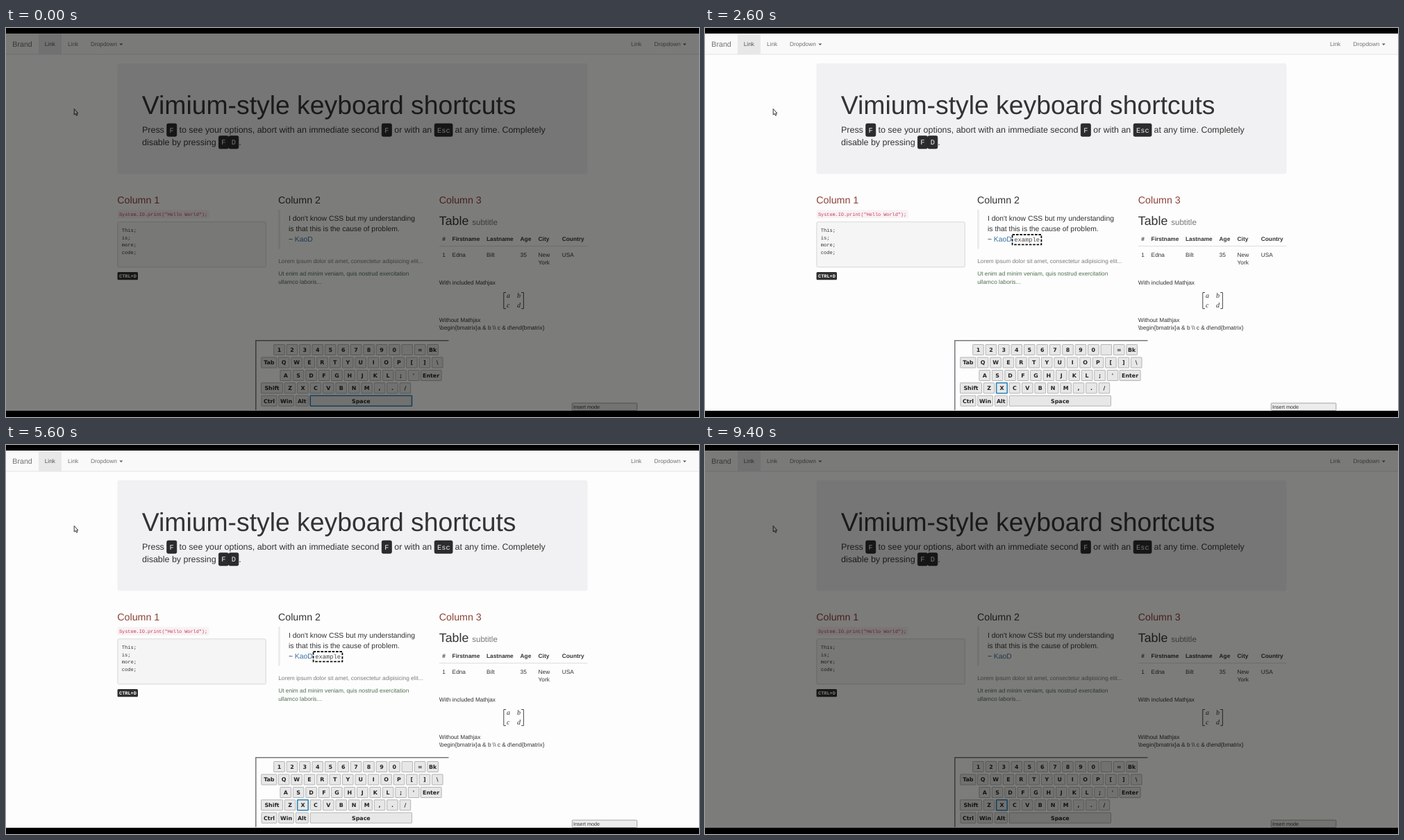
An HTML page for the animation above (9.6 s loop, 998 by 561 pixels).

```html
<!DOCTYPE html>
<html lang="en">
<head>
<meta charset="utf-8">
<title>Keyboard shortcuts demo</title>
<style>
  html, body { margin: 0; width: 100%; height: 100%; overflow: hidden; background: #000; }
  svg { display: block; width: 998px; height: 561px; }
  text { font: 8.3px "Liberation Sans", Arial, sans-serif; fill: #333; text-rendering: geometricPrecision; white-space: pre; }
  .mono { font-family: "Liberation Mono", monospace; }
  .math { font-family: "Liberation Serif", serif; font-style: italic; }
  .bold { font-weight: bold; }
  .cap { font: bold 7.9px "DejaVu Sans", sans-serif; text-anchor: middle; fill: #222; }
  .key rect { fill: #e7e7e7; stroke: #b4b4b4; }
  .focus rect { stroke: #2b84b5; stroke-width: 1.6; }
  .press rect { fill: #cde6f7; }
</style>
</head>
<body>
<svg id="stage" viewBox="0 0 998 561"></svg>
<script>
const stage = document.getElementById('stage');

function add(tag, attrs, parent = stage) {
  const el = document.createElementNS('http://www.w3.org/2000/svg', tag);
  for (const name in attrs) el.setAttribute(name, attrs[name]);
  return parent.appendChild(el);
}
function box(x, y, w, h, fill, more = {}, parent = stage) {
  return add('rect', { x, y, width: w, height: h, fill, ...more }, parent);
}
function text(str, x, y, size = 8.3, fill = '#333', cls = '', parent = stage) {
  const el = add('text', { x, y, class: cls, style: `font-size:${size}px;fill:${fill}` }, parent);
  el.textContent = str;
  return el;
}
function path(d, fill = 'none', stroke = 'none', width = 1) {
  return add('path', { d, fill, stroke, 'stroke-width': width });
}

// Navigation bar
box(0, 8, 998, 544, '#fdfdfd');
box(0, 8, 998, 30, '#f9f9fa');
box(0, 37.5, 998, 1, '#e4e4e6');
box(47, 8.5, 33, 29.5, '#e8e8e9');
const grey = '#707070';
text('Brand', 9.3, 26.8, 10.68, grey);
text('Link', 55.7, 26.2, 8.3, '#555');
for (const x of [89, 900]) text('Link', x, 26.2, 8.3, grey);
for (const x of [122, 933.5]) {
  text('Dropdown', x, 26.2, 8.3, grey);
  path(`M${x + 41.3} 22.4h5l-2.5 2.6z`, '#555');
}

// Jumbotron
box(160.5, 51, 677, 159.5, '#f1f1f3', { rx: 3 });
text('Vimium-style keyboard shortcuts', 195.8, 124, 37.35);
const lead = (str, x, y) => text(str, x, y, 12.46);
lead('Press ', 196, 151);
lead('to see your options, abort with an immediate second', 249.5, 151);
lead('or with an', 559.3, 151);
lead('at any time. Completely', 646.6, 151);
lead('disable by pressing', 196, 168.7);
lead('.', 335.3, 168.7);
function kbd(str, x, y, w) {
  box(x, y, w, 18.2, '#2c2c2e', { rx: 1.8, stroke: '#1b1b1b', 'stroke-width': .8 });
  text(str, x + 3.9, y + 12.6, 10.3, '#f4f4f4', 'mono');
}
kbd('F', 231.7, 138, 14);
kbd('F', 541.3, 138, 14);
kbd('Esc', 617.2, 138, 25.8);
kbd('F', 306.4, 155.7, 14);
kbd('D', 320.8, 155.7, 14);

// First column
const maroon = '#8c4238';
text('Column 1', 160.3, 252.6, 14.24, maroon);
box(160.5, 262.5, 132, 12, '#f9f1f3', { rx: 2 });
text('System.IO.print("Hello World");', 163, 270.9, 6.83, '#c23a56', 'mono');
box(160.8, 279.7, 213.5, 65.2, '#f5f5f5', { rx: 2, stroke: '#cfcfcf', 'stroke-width': .8 });
['This;', 'is;', 'more;', 'code;'].forEach((str, i) => text(str, 166.8, 294 + i * 10.65, 7.05, '#333', 'mono'));
box(160.5, 352, 29.5, 11.3, '#303030', { rx: 1.5 });
text('CTRL+D', 163, 360.2, 6.9, '#fff', 'mono bold');

// Second column
text('Column 2', 392, 252.6, 14.24);
box(392, 262, 3, 56.5, '#ececee');
text("I don't know CSS but my understanding", 407, 278, 10.38);
text('is that this is the cause of problem.', 407, 292.9, 10.38);
text('~', 407, 307.8, 10.38);
text('KaoD', 415.8, 307.8, 10.38, '#3f73a3');
text('Lorem ipsum dolor sit amet, consectetur adipisicing elit...', 392.2, 339, 8.3, '#7c7c7c');
text('Ut enim ad minim veniam, quis nostrud exercitation', 392.2, 356.6, 8.3, '#4f6f50');
text('ullamco laboris...', 392.2, 368.5, 8.3, '#4f6f50');

// Third column
text('Column 3', 623.8, 252.6, 14.24, maroon);
text('Table', 623.8, 283.8, 17.8);
text('subtitle', 671.2, 283.8, 11.57, '#777');
const cells = [628.3, 642.6, 692, 740.6, 766.6, 800.8];
'# Firstname Lastname Age City Country'.split(' ').forEach((s, i) => text(s, cells[i], 307, 8.3, '#333', 'bold'));
'1 Edna Bilt 35 New USA'.split(' ').forEach((s, i) => text(s, cells[i], 329.6, 8.3));
text('York', cells[4], 341.4);
box(623.8, 314, 213.5, 1.1, '#e0e0e0');
text('With included Mathjax', 623.8, 369.9);
path('M720 381.5h-3.2v23.2h3.2M742.2 381.5h3.2v23.2h-3.2', 'none', '#333', .9);
[['a', 721, 389.4], ['b', 736, 389.4], ['c', 721, 402.8], ['d', 736, 402.8]]
  .forEach(([s, x, y]) => text(s, x, y, 10, '#333', 'math'));
text('Without Mathjax', 623.8, 423.6);
text('\\begin{bmatrix}a & b \\\\ c & d\\end{bmatrix}', 623.8, 435.4);

// On-screen keyboard
path('M637.5 450.8H359.8V551', 'none', '#77777c', 1.5);
const keys = {};
function key(name, x, y, w = 16.6) {
  const g = keys[name] = add('g', { class: 'key' });
  box(x + .5, y + .5, w - 1, 15, '', { rx: .6 }, g);
  add('text', { x: x + w / 2, y: y + 10.9, class: 'cap' }, g).textContent = name;
}
function row(names, x, y) {
  names.forEach((name, i) => key(name, x + i * 18.43, y));
}
row([...'1234567890', ' ', '=', 'Bk'], 385.2, 456);
key('Tab', 367.3, 474.5, 23);
row([...'QWERTYUIOP[]\\'], 391.8, 474.5);
row([..."ASDFGHJKL;'"], 394.4, 493);
key('Enter', 596.6, 493, 31);
key('Shift', 367, 511.3, 32);
row([...'ZXCVBNM,./'], 400.7, 511.3);
key('Ctrl', 367.5, 529.7, 23);
key('Win', 392.3, 529.7, 22.6);
key('Alt', 416.8, 529.7, 19);
key('Space', 437.7, 529.7, 147.3);

// Status box and pointer
box(815.3, 541, 93.5, 10.5, '#ececec', { rx: 1, stroke: '#999', 'stroke-width': .9 });
text('Insert mode', 817, 548.7, 7.2);
path('M98.2 116.6v8.6l1.9-1.7 1.4 2.9 1.4-.7-1.3-2.7h2.3z', '#fff', '#222', .9);

// Link hint
const hint = add('g', {});
box(442.6, 298, 41.8, 14.4, '#fff', { stroke: '#111', 'stroke-width': 1.8, 'stroke-dasharray': '3.6 1.8' }, hint);
text('example', 445.2, 308, 8.8, '#444', 'mono', hint);

const shade = box(0, 8, 998, 544, '#030300', { 'fill-opacity': .515 });

// Each step: start time, key, pressed or only focused
const steps = [
  [0, 'Space', false],
  [1400, 'F', true], [1600, 'F', false],
  [1800, 'E', true], [2000, 'E', false],
  [2200, 'X', true], [2400, 'X', false]
];
const loop = 9600;

function draw(now) {
  const t = now % loop;
  const [, name, pressed] = steps.findLast(step => step[0] <= t);
  for (const k in keys) {
    keys[k].setAttribute('class', k !== name ? 'key' : pressed ? 'key focus press' : 'key focus');
  }
  hint.style.display = t >= 1600 && t < 6400 ? '' : 'none';
  shade.style.display = t < 200 || t >= 9400 ? '' : 'none';
  requestAnimationFrame(() => draw(performance.now() - start));
}
const start = performance.now();
draw(0);
</script>
</body>
</html>
```
